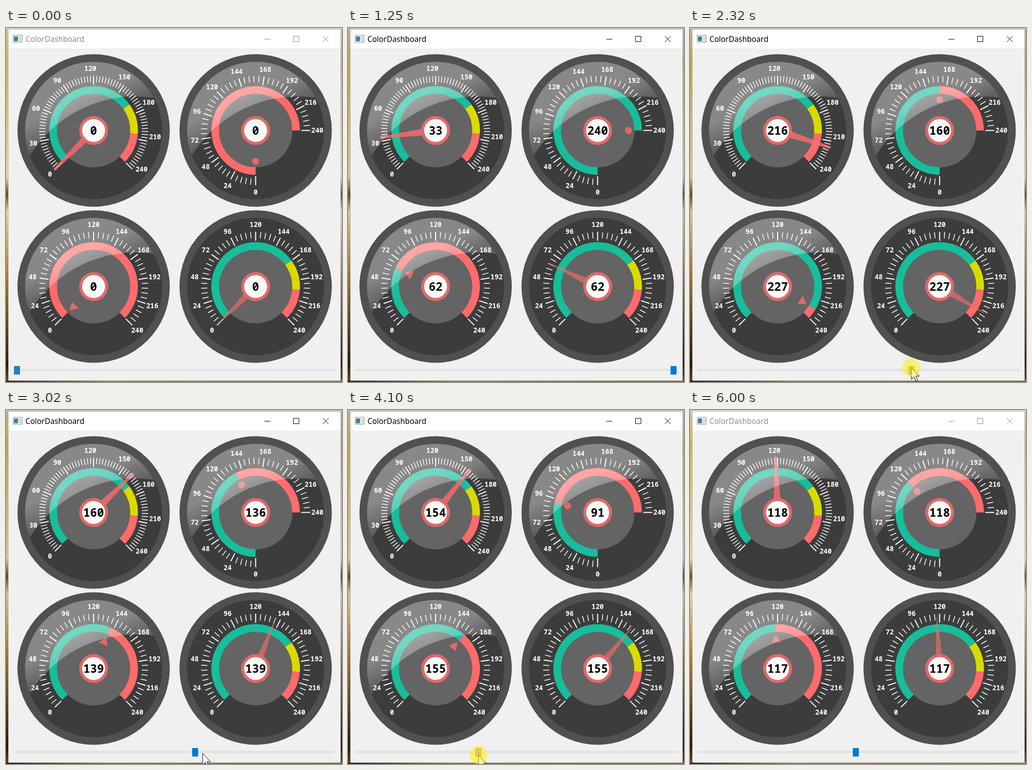
Write an HTML page that moves like this. It is 675x710 px and loops after 6070 ms.

```html
<!DOCTYPE html>
<html lang="en">
<head>
<meta charset="utf-8">
<title>ColorDashboard</title>
<style>
html, body { margin: 0; width: 100%; height: 100%; overflow: hidden; background: #f0f0f0; }
svg { display: block; }
.num { font: 700 13.5px "Noto Sans Mono", "DejaVu Sans Mono", monospace; fill: #fff; text-anchor: middle; }
.val { font: 700 23px "Noto Sans Mono", "DejaVu Sans Mono", monospace; fill: #000; text-anchor: middle; }
.title { font: 15.4px "Noto Sans", "Open Sans", sans-serif; }
</style>
</head>
<body>
<svg id="stage" width="675" height="710" viewBox="0 0 675 710">
  <defs>
    <linearGradient id="gloss" gradientUnits="userSpaceOnUse" x1="-29" y1="-62.5" x2="0" y2="0">
      <stop offset="0" stop-color="#fff" stop-opacity=".392"/>
      <stop offset="1" stop-color="#fff" stop-opacity=".118"/>
    </linearGradient>
    <linearGradient id="gold" x1="0" y1="0" x2="0" y2="1">
      <stop offset="0" stop-color="#cfc3a2"/>
      <stop offset=".1" stop-color="#d2b05c"/>
      <stop offset=".42" stop-color="#e6d3a6"/>
      <stop offset=".47" stop-color="#6b4a1c"/>
      <stop offset=".52" stop-color="#efcfa0"/>
      <stop offset=".7" stop-color="#a97b36"/>
      <stop offset=".95" stop-color="#2a1706"/>
      <stop offset="1" stop-color="#6a4c1e"/>
    </linearGradient>
    <linearGradient id="floor">
      <stop offset="0" stop-color="#3a220a"/>
      <stop offset=".3" stop-color="#a8843c"/>
      <stop offset="1" stop-color="#9a7638"/>
    </linearGradient>
    <clipPath id="face"><circle r="137.8"/></clipPath>
  </defs>
  <rect width="675" height="710" fill="url(#gold)"/>
  <rect y="707" width="675" height="3" fill="url(#floor)"/>
  <rect width="675" height="3" fill="#d3d0c8"/>
  <rect id="shade" width="675" height="710" fill="#000" opacity=".08"/>
  <rect x="4.5" y="3" width="668" height="704.5" fill="#aaa59c"/>
  <rect x="5" y="3.5" width="667" height="703.5" fill="#f0f0f0"/>
  <rect x="5" y="3.5" width="667" height="37.5" fill="#fff"/>
  <rect x="14.5" y="14.5" width="18" height="14" fill="#f4f4f4" stroke="#8b8f94"/>
  <rect x="16" y="17" width="8" height="9.5" fill="#3a8290"/>
  <rect x="25.5" y="17" width="5.5" height="9.5" fill="#d4d8da"/>
  <g id="bar">
    <text class="title" x="39" y="28" fill="currentColor">ColorDashboard</text>
    <path d="M519 22.5H531M577.5 16.5H588.5V27.5H577.5ZM636.5 16.5L648 28M648 16.5L636.5 28" fill="none" stroke="currentColor"/>
  </g>
  <g id="dials"></g>
  <rect x="16.5" y="684.5" width="644" height="3" fill="#e7eaea" stroke="#d6d6d6"/>
  <rect id="handle" y="678" width="12" height="17"/>
  <path id="arrow" d="M.5 .5V23.5L5.8 18.6L9.6 27.6L13 26.2L9.2 17.2H16.2Z" fill="#fff" stroke="#000"/>
  <circle id="spot" r="18" fill="#fff200" opacity=".52"/>
</svg>
<script>
const LOOP = 6070, STEP = 77.2, WAKE = 930, SLEEP = 6000;
const MAX = 240, SWEEP = 270, LEFT = 22, TRAVEL = 632;
const GREEN = '#18bd9b', YELLOW = '#dada00', RED = '#ff6b6b', RIM = '#e06a6a';
const $ = id => document.getElementById(id);

function add(parent, tag, attrs, text) {
  const el = document.createElementNS('http://www.w3.org/2000/svg', tag);
  for (const k in attrs) el.setAttribute(k, attrs[k]);
  if (text !== undefined) el.textContent = text;
  parent.appendChild(el);
  return el;
}

// Angles run clockwise from straight down.
function polar(deg, r) {
  const a = deg * Math.PI / 180;
  return [-r * Math.sin(a), r * Math.cos(a)].map(n => n.toFixed(2));
}

function arc(from, to) {
  if (to - from < 0.05) return '';
  const r = 81.25;
  return `M${polar(from, r)}A${r} ${r} 0 ${to - from > 180 ? 1 : 0} 1 ${polar(to, r)}`;
}

const pointers = {
  needle(g) {
    g.setAttribute('opacity', 0.8);
    add(g, 'path', { d: 'M-8 0L-2.2 109.5H2.2L8 0Z', fill: RED });
    add(g, 'path', { d: 'M0 0V109.5', stroke: RED, 'stroke-width': 5.4, 'stroke-linecap': 'round' });
  },
  spike(g) { add(g, 'path', { d: 'M-8.4 0L0 111L8.4 0Z', fill: RED, opacity: 0.6 }); },
  dot(g) { add(g, 'circle', { cy: 62, r: 7, fill: RED, opacity: 0.8 }); },
  wedge(g) { add(g, 'path', { d: 'M-9.5 52.5H9.5L0 68Z', fill: RED, opacity: 0.8 }); }
};

function dial({ x, y, hand, start = 45, major = 10, minor = 5, zones = false, gloss = true }) {
  const g = add($('dials'), 'g', { transform: `translate(${x} ${y})` });
  const end = start + SWEEP;

  add(g, 'circle', { r: 153, fill: '#505050' });
  add(g, 'circle', { r: 137.8, fill: '#3c3c3c' });
  add(g, 'circle', { r: 74, fill: '#646464' });

  const bands = (zones ? [GREEN, YELLOW, RED] : [GREEN, RED]).map(stroke =>
    add(g, 'path', { fill: 'none', stroke, 'stroke-width': 15.5 }));
  const cut = stops => bands.forEach((b, i) => b.setAttribute('d', arc(stops[i], stops[i + 1])));
  if (zones) cut([start, start + SWEEP * 0.7, start + SWEEP * 0.85, end]);

  const count = major * minor;
  for (let i = 0; i <= count; i++) {
    const big = i % minor === 0;
    add(g, 'path', {
      d: `M0 ${big ? 92.5 : 97.5}V109`, stroke: '#fff', 'stroke-linecap': 'round',
      'stroke-width': big ? 2 : 1.5, transform: `rotate(${start + SWEEP * i / count})`
    });
  }
  // Labels advance by whole degrees.
  const gap = Math.floor(SWEEP / major);
  for (let i = 0; i <= major; i++) {
    const [lx, ly] = polar(start + gap * i, 124);
    add(g, 'text', { class: 'num', x: lx, y: +ly + 4.8 }, MAX / major * i);
  }

  const pointer = add(g, 'g', {});
  pointers[hand](pointer);
  add(g, 'circle', { r: 29, fill: RIM });
  add(g, 'circle', { r: 23, fill: '#fafafa' });
  const label = add(g, 'text', { class: 'val', y: 8.7 });

  if (gloss) {
    add(g, 'path', {
      d: 'M-140 -140H140V-62A250 250 0 0 0 -140 72Z',
      fill: 'url(#gloss)', 'clip-path': 'url(#face)'
    });
  }
  return v => {
    const a = start + SWEEP * v / MAX;
    pointer.setAttribute('transform', `rotate(${a})`);
    if (!zones) cut([start, a, end]);
    label.textContent = Math.floor(v);
  };
}

const slowDial = dial({ x: 176, y: 205.5, major: 8, minor: 10, hand: 'needle', zones: true });
const liveDial = dial({ x: 501.5, y: 205.5, start: 0, hand: 'dot' });
const fastDials = [
  dial({ x: 176, y: 518.5, hand: 'wedge' }),
  dial({ x: 501.5, y: 518.5, hand: 'spike', zones: true, gloss: false })
];

const ease = p => p < 0.5 ? 2 * p * p : 1 - 2 * (1 - p) ** 2;

// Eased moves, each [begin, end, goal], starting from a rest value.
function follow(rest, moves) {
  return t => {
    let v = rest;
    for (const [a, b, goal] of moves) {
      if (t >= b) v = goal;
      else if (t > a) return v + (goal - v) * ease((t - a) / (b - a));
    }
    return v;
  };
}

const slider = follow(LEFT, [[930, 1200, 654], [2150, 2408, 380], [3490, 3720, 583],
  [3720, 4350.6, 105], [4570, 4750, 333]]);
const slow = follow(0, [[930, 2039, 216], [2320, 3418, 140], [3490, 4095, 154.4], [4095, 5327, 118.2]]);
const fast = follow(0, [[930, 1786, 240], [2047, 3158.6, 136], [3490, 3803.5, 184],
  [3803.5, 4650, 64], [4650, 4890, 117.3]]);

const visits = [
  { enter: 380, press: 930, release: 1170, leave: 1240, y: 688 },
  { enter: 2110, press: 2170, release: 2790, leave: 3100, y: 681 },
  { enter: 3410, press: 3490, release: 4750, leave: 4890, y: 692 }
];

// The mouse slides up to the handle, holds it, then drops off the bottom edge.
function mouse(t, x) {
  const v = visits.find(v => t >= v.enter && t < v.leave);
  if (!v) return { x, y: 720, down: false };
  const away = Math.max(0, (v.press - t) / (v.press - v.enter), (t - v.release) / (v.leave - v.release));
  return { x: x + 20 * away, y: v.y + 26 * away ** 4, down: away === 0 };
}

function draw(time) {
  const t = WAKE + Math.floor((time - WAKE) / STEP) * STEP;
  const x = slider(t), m = mouse(t, x);
  const active = time >= WAKE && time < SLEEP;
  const place = `translate(${m.x} ${m.y})`;

  slowDial(slow(t));
  liveDial(Math.round((x - LEFT) / TRAVEL * MAX));
  fastDials.forEach(set => set(fast(t)));
  $('bar').style.color = active ? '#000' : '#8f8f8f';
  $('shade').style.display = active ? '' : 'none';
  $('handle').setAttribute('x', x - 6);
  $('handle').setAttribute('fill', m.down ? '#a8a8a8' : t < WAKE ? '#2a7bc0' : '#0078d7');
  $('spot').style.display = m.down ? '' : 'none';
  $('spot').setAttribute('transform', place);
  $('arrow').setAttribute('transform', place);
}

const begin = performance.now();
function frame() {
  draw((performance.now() - begin) % LOOP);
  requestAnimationFrame(frame);
}
frame();
</script>
</body>
</html>
```
